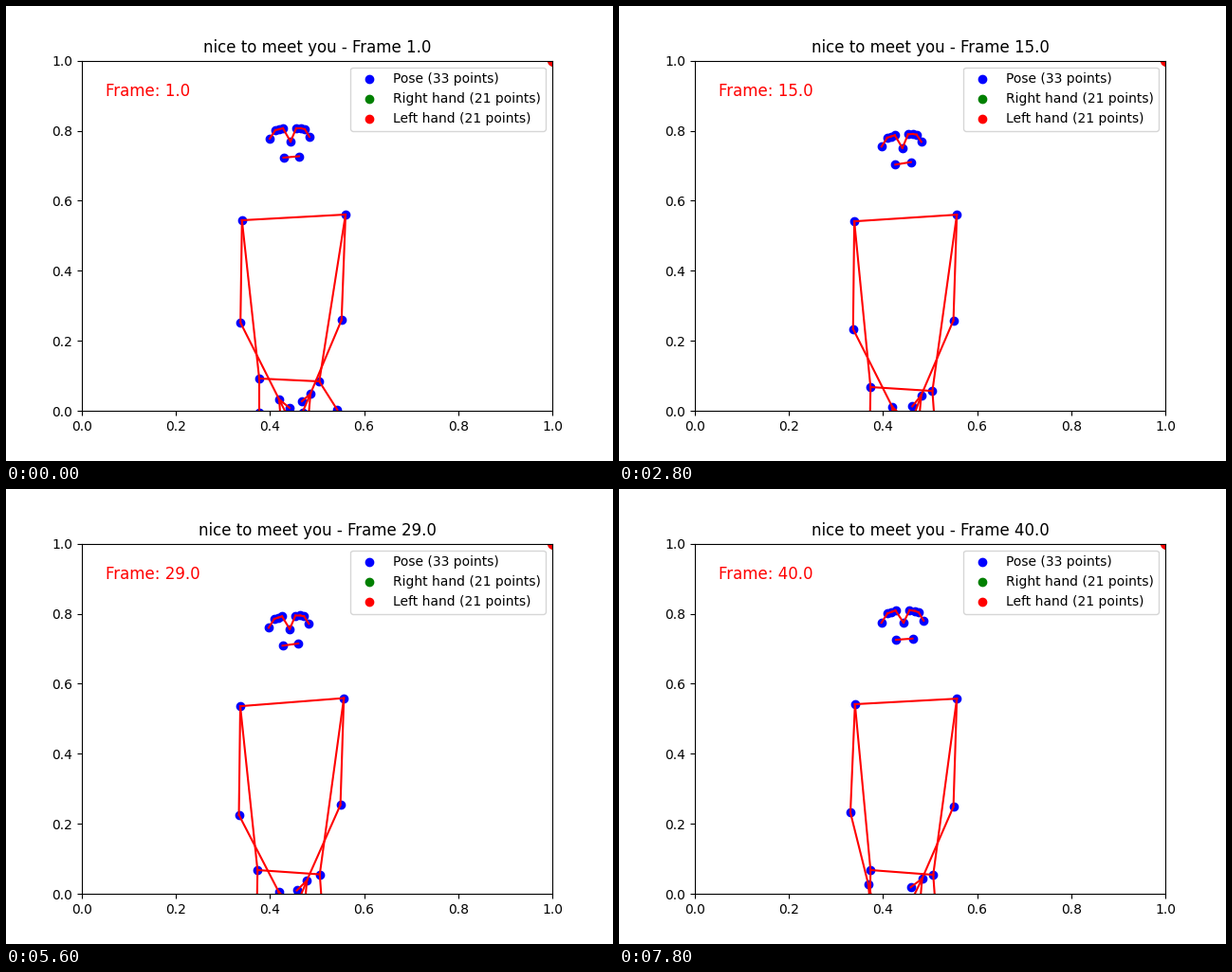
These frames come from a looping animation (640 by 480 pixels, 8 s). A matplotlib script:

```python
import numpy as np
import matplotlib.pyplot as plt
from matplotlib.animation import FuncAnimation
from matplotlib.collections import LineCollection

FRAMES = 40
t = np.arange(FRAMES)
u = t / (FRAMES - 1)

# how far each movement has gone, per frame
MOVES = {
    "settle": 1 - np.exp(-t / 1.8),            # quick drop at the start
    "drift": u ** 2,                           # slow change over the loop
    "slump": np.sin(np.pi * u ** 2),           # sag and recover
    "lift": np.exp(-((t - 34.5) / 2.5) ** 2),  # brief raise of the hands
    "swing": u ** 12,                          # late outward swing
}
nod = 8 * np.sin(np.pi * np.minimum(u ** 0.8, 1)).clip(0) ** 0.75
tilt = u ** 5


def joint(x, y, parent=0, **shifts):
    """Rest point in pixels plus a (dx, dy) shift for each named movement."""
    path = np.tile([x, y], (FRAMES, 1)).astype(float)
    for move, shift in shifts.items():
        path += np.outer(MOVES[move], shift)
    return parent + path


def face_point(x, y):
    """The nod is strongest on the left; the tilt widens and bends the face."""
    off = x - 300
    px = x - 0.15 * nod + 0.06 * off * tilt
    py = y + (0.86 - 0.009 * off) * nod + (abs(off) / 7 - 2) * tilt
    return np.column_stack([px, py])


def build_face():
    brow = [(278, 140), (284, 131), (288, 130), (292, 129), (300, 143),
            (306, 129), (311, 129), (315, 130), (320, 138)]
    p = {f"brow{i}": face_point(x, y) for i, (x, y) in enumerate(brow)}
    p["mouth_a"] = face_point(292.5, 160)
    p["mouth_b"] = face_point(309, 158.5)
    return p


def build_body():
    p = {}
    p["shoulder_a"] = joint(248.8, 226, slump=(-1.8, 2.6), drift=(0, 1))
    p["shoulder_b"] = joint(358, 220, settle=(-1.8, 0), drift=(0, 1.2))
    p["elbow_a"] = joint(247.2, 334, settle=(0, 5), slump=(0, 3.5),
                         drift=(-3.2, 2.5), lift=(-0.5, -3.5))
    p["elbow_b"] = joint(353.8, 331.2, settle=(-1.2, 0), drift=(0, 4))
    p["hip_a"] = joint(267, 393, settle=(-1.8, 9))
    p["hip_b"] = joint(330.3, 396, settle=(0, 10), drift=(1, 1))
    p["knee_a"] = joint(0, 36, p["hip_a"], settle=(-1.5, 54))
    p["knee_b"] = joint(19, 30, p["hip_b"], settle=(-12.5, 60))

    a = p["wrist_a"] = joint(288, 415, settle=(0, 6), slump=(0, 4),
                             lift=(0, -15), swing=(-25, -3))
    p["thumb_a"] = joint(11, 9, a, settle=(2, 4), lift=(4, -2), swing=(-9, 3))
    p["index_a"] = joint(11, 22, a, swing=(-7, 0))
    p["pinky_a"] = joint(2, 26, a)

    b = p["wrist_b"] = joint(321, 409, settle=(-1.5, 0.5), slump=(-2.3, 2.6),
                             drift=(0, 1.8), lift=(2, -5))
    p["thumb_b"] = joint(-9, 8, b, settle=(0, 4), drift=(-3, -3))
    p["index_b"] = joint(-8.5, 20, b, settle=(0, 5), drift=(-3.5, 0), lift=(0, -4))
    p["pinky_b"] = joint(-2, 24, b)
    return p


def build_bones():
    bones = [(f"brow{i}", f"brow{i + 1}") for i in range(8)]
    bones += [(n + "_a", n + "_b") for n in ("mouth", "shoulder", "hip")]
    limbs = [("shoulder", "elbow"), ("elbow", "wrist"), ("wrist", "thumb"),
             ("wrist", "index"), ("wrist", "pinky"), ("pinky", "index"),
             ("shoulder", "hip"), ("hip", "knee")]
    bones += [(n + s, m + s) for s in ("_a", "_b") for n, m in limbs]
    return bones


def to_axes(px):
    return (px - [80, 427.2]) / [496, -369.6]


joints = {n: to_axes(p) for n, p in {**build_face(), **build_body()}.items()}
bones = build_bones()

fig, ax = plt.subplots(figsize=(6.4, 4.8), dpi=100)
ax.set_xlim(0, 1)
ax.set_ylim(0, 1)
pose = ax.scatter([], [], c="blue", label="Pose (33 points)")
# undetected hands: all their points rest in the corner
corner = np.ones(21)
ax.scatter(corner, corner, c="green", label="Right hand (21 points)")
ax.scatter(corner, corner, c="red", label="Left hand (21 points)")
lines = LineCollection([], colors="red", linewidths=1.5, capstyle="projecting")
ax.add_collection(lines, autolim=False)
ax.legend(loc="upper right")
title = ax.set_title("")
label = ax.text(0.05, 0.9, "", color="red", fontsize=12, transform=ax.transAxes)


def draw(i):
    pose.set_offsets([p[i] for p in joints.values()])
    lines.set_segments([(joints[a][i], joints[b][i]) for a, b in bones])
    title.set_text(f"nice to meet you - Frame {i + 1:.1f}")
    label.set_text(f"Frame: {i + 1:.1f}")
    return pose, lines, title, label


anim = FuncAnimation(fig, draw, frames=FRAMES, interval=200, repeat=True)
plt.show()
```
